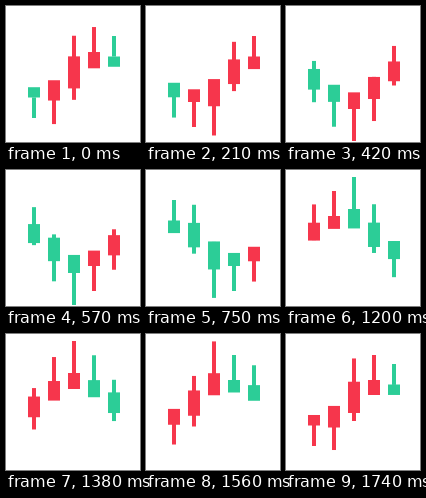
These frames come from a looping animation (134x136 px, 1770 ms). An HTML page:

```html
<!DOCTYPE html>
<html lang="en">
<head>
<meta charset="utf-8">
<title>Candlestick loader</title>
<style>
  html, body { margin: 0; width: 100%; height: 100%; overflow: hidden; background: #fff; }
  svg { display: block; width: 100%; height: 100%; }
</style>
</head>
<body>
<svg id="chart" viewBox="0 0 134 136"></svg>
<script>
  const PERIOD = 1770, STEP = 30;
  const MOVE = 724;    // time one body edge takes to travel
  const LAG = 74;      // leading and trailing edges run this far around the midpoint
  const LEAD = 460;    // colour flips this long before the midpoint
  const MID_Y = 71;
  const GREEN = '#2ccd97', RED = '#f6364c';
  const chart = document.getElementById('chart');

  const mod = (v, n) => ((v % n) + n) % n;

  // cubic-bezier(.42, 0, .58, 1)
  function ease(x) {
    if (x <= 0) return 0;
    if (x >= 1) return 1;
    let lo = 0, hi = 1;
    for (let i = 0; i < 20; i++) {
      const s = (lo + hi) / 2, r = 1 - s;
      if (1.26 * r * r * s + 1.74 * r * s * s + s * s * s < x) lo = s;
      else hi = s;
    }
    return lo * lo * (3 - 2 * lo);
  }

  // 0..1 position of an edge that climbs around `up` and drops around `down`
  function edge(t, up, down) {
    const p = mod(t - up + MOVE / 2, PERIOD);
    const drop = mod(down - up, PERIOD);
    return ease(p / MOVE) - ease((p - drop) / MOVE) + 1 - ease((p + PERIOD - drop) / MOVE);
  }

  function addRect(x, width) {
    const rect = document.createElementNS('http://www.w3.org/2000/svg', 'rect');
    rect.setAttribute('x', x);
    rect.setAttribute('width', width);
    return chart.appendChild(rect);
  }

  function place(rect, top, bottom, fill) {
    rect.setAttribute('y', top);
    rect.setAttribute('height', bottom - top);
    rect.setAttribute('fill', fill);
  }

  const candles = [41, 50, 64, 50, 41].map((reach, i) => ({
    reach,
    up: 900 + 223 * (i - 2),
    down: 1814 + 231 * (i - 2),
    wick: addRect(26 + 20 * i, 4),
    body: addRect(22 + 20 * i, 12)
  }));

  function draw(now) {
    const t = Math.floor(mod(now, PERIOD) / STEP) * STEP;
    for (const { reach, up, down, wick, body } of candles) {
      const high = reach * (0.75 * edge(t, up - LAG, down + LAG) - 0.25);
      const low = reach * (0.75 * edge(t, up + LAG, down - LAG) - 0.5);
      const rising = mod(t - up + LEAD, PERIOD) < mod(down - up, PERIOD);
      const fill = rising ? GREEN : RED;
      place(body, MID_Y - high, MID_Y - low, fill);
      place(wick, MID_Y - 2 * high, MID_Y - 2 * low, fill);
    }
  }

  function tick(now) {
    draw(now);
    requestAnimationFrame(tick);
  }

  draw(0);
  requestAnimationFrame(tick);
</script>
</body>
</html>
```
